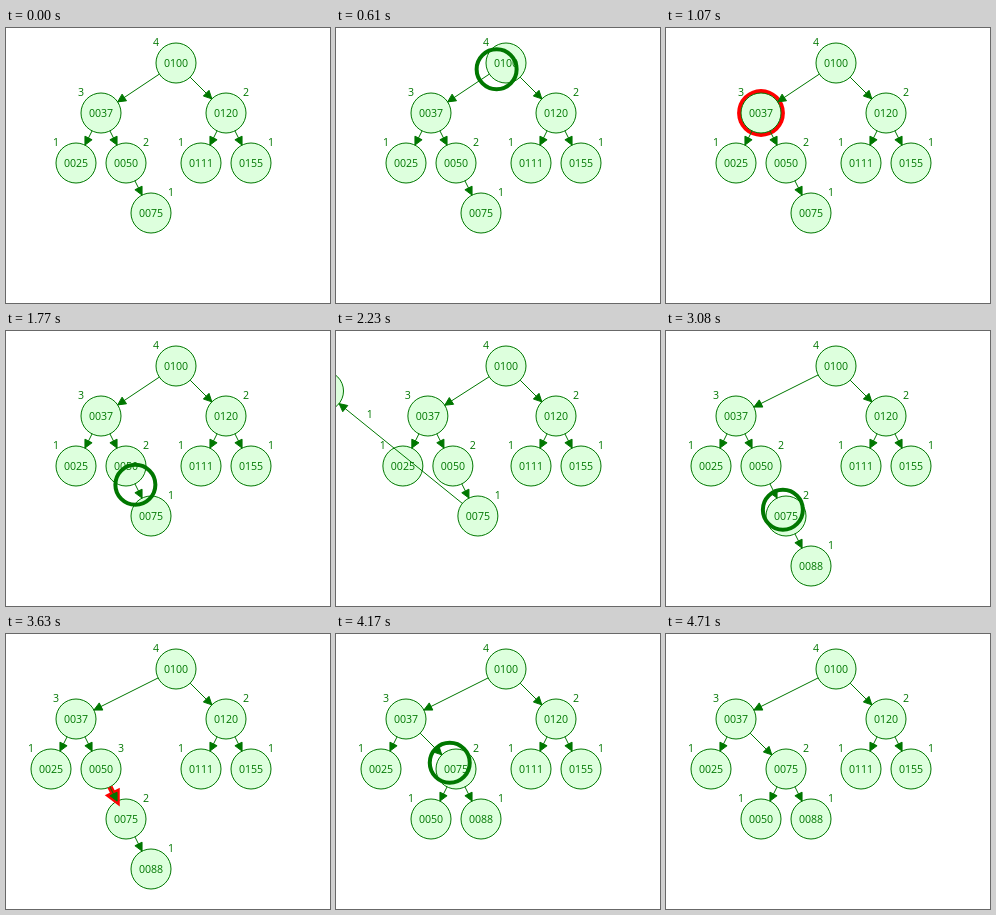
An HTML page for the animation above (5410 ms loop, 324 by 275 pixels).

```html
<!DOCTYPE html>
<html lang="en">
<head>
<meta charset="utf-8">
<title>AVL tree insertion</title>
<style>
  html, body { margin: 0; width: 100%; height: 100%; overflow: hidden; background: #fff; }
  svg { display: block; }
  text { font: 10.6px "Open Sans", "Noto Sans", sans-serif; text-anchor: middle; }
</style>
</head>
<body>
<svg id="stage" width="324" height="275" viewBox="0 0 324 275"></svg>
<script>
const GREEN = '#007700', PALE = '#ddffdd', RED = '#ff0000';
const LOOP = 5410, START = 380, TICK = 77.3;
const stage = document.getElementById('stage');

function add(tag, attrs, parent) {
  const el = document.createElementNS('http://www.w3.org/2000/svg', tag);
  set(el, attrs);
  return parent.appendChild(el);
}
function set(el, attrs) {
  for (const k in attrs) el.setAttribute(k, attrs[k]);
}
const show = (el, on) => set(el, { visibility: on ? 'visible' : 'hidden' });

const [nodeLayer, labelLayer, ringLayer, edgeLayer] = [0, 0, 0, 0].map(() => add('g', {}, stage));

// places: before the insertion, after it, after the rotation
const nodes = {};
function node(key, height, side, ...places) {
  const g = add('g', {}, nodeLayer);
  const halo = add('circle', { fill: RED }, g);
  add('circle', { r: 20, fill: PALE, stroke: GREEN }, g);
  add('text', { y: 3.6, fill: GREEN }, g).textContent = key.padStart(4, '0');
  const label = add('text', { fill: GREEN }, labelLayer);
  while (places.length < 3) places.push(places[places.length - 1]);
  const tags = places.map(([x, y]) => [x + 20 * side, y - 20.5]);
  nodes[key] = { g, halo, label, height, places, tags };
}
node('100', 4, -1, [170, 35]);
node('37', 3, -1, [95, 85], [70, 85]);
node('120', 2, 1, [220, 85]);
node('25', 1, -1, [70, 135], [45, 135]);
node('50', 2, 1, [120, 135], [95, 135], [95, 185]);
node('111', 1, -1, [195, 135]);
node('155', 1, 1, [245, 135]);
node('75', 1, 1, [145, 185], [120, 185], [120, 135]);
node('88', 1, 1, [-35, 35], [145, 235], [145, 185]);
nodes['88'].tags[0] = [15, 65];
nodes['50'].tags[2] = [75, 164.5];

const ring = add('circle', { r: 20, fill: 'none', stroke: GREEN, 'stroke-width': 4 }, ringLayer);

// each edge exists from tick "from" until tick "to"
const INSERT = 24, ROTATE = 46;
const edges = [
  ['100', '37'], ['100', '120'], ['37', '25'], ['120', '111'], ['120', '155'],
  ['37', '50', -99, ROTATE], ['50', '75', -99, ROTATE], ['75', '88', INSERT],
  ['37', '75', ROTATE], ['75', '50', ROTATE]
].map(([a, b, from = -99, to = 99]) => ({
  a, b, from, to,
  glow: add('path', { fill: RED, stroke: RED }, edgeLayer),
  line: add('path', { fill: GREEN, stroke: GREEN }, edgeLayer)
}));

// ring trips: from, to, first tick, ticks shown, speed in eighths per tick
const trips = [
  ['100', '37', 3, 4], ['37', '50', 10, 4], ['50', '75', 17, 4],
  ['88', '75', 28, 4], ['75', '50', 35, 3], ['75', '37', 49, 4], ['37', '100', 53, 3, 3]
];
const halos = { '100': 0, '37': 7, '50': 14, '75': 21 };

const clamp = v => Math.max(0, Math.min(1, v));
const lerp = (a, b, f) => a.map((v, i) => v + (b[i] - v) * f);
const eighths = (k, first = 1, speed = 2.5) => k < 0 ? 0 : clamp(Math.floor(first + speed * k) / 8);

function arrow([x1, y1], [x2, y2]) {
  const d = Math.hypot(x2 - x1, y2 - y1), ux = (x2 - x1) / d, uy = (y2 - y1) / d;
  const hx = x2 - 20 * ux, hy = y2 - 20 * uy;
  const bx = hx - 8 * ux, by = hy - 8 * uy;
  return `M${x1 + 20 * ux} ${y1 + 20 * uy}L${hx} ${hy}` +
    `M${hx} ${hy}L${bx - 4 * uy} ${by + 4 * ux}L${bx + 4 * uy} ${by - 4 * ux}Z`;
}

function draw(t) {
  const n = Math.min(56, Math.floor((t - START) / TICK + 0.2));
  const grow = eighths(n - INSERT), turn = eighths(n - ROTATE, 2);
  const place = p => turn > 0 ? lerp(p[1], p[2], turn) : lerp(p[0], p[1], grow);
  const pulse = k => 3 + Math.abs((k * 0.343) % 8 - 4);
  const at = {};

  for (const key in nodes) {
    const o = nodes[key];
    const [x, y] = at[key] = place(o.places);
    const [lx, ly] = place(o.tags);
    const first = halos[key];
    const lit = n >= first && n < first + 3;
    set(o.g, { transform: `translate(${x} ${y})` });
    set(o.halo, { r: lit ? 20 + pulse(n) : 0 });
    let h = o.height, hot = false;
    if (key === '75' && n >= 32) { h = 2; hot = n < 35; }
    if (key === '50' && n >= 38) { h = n < ROTATE ? 3 : 1; hot = n < 42; }
    o.label.textContent = h;
    set(o.label, { x: lx, y: ly + 3.7, fill: hot ? RED : GREEN });
  }
  show(nodes['88'].g, n >= INSERT);
  show(nodes['88'].label, n >= INSERT);

  const trip = trips.find(([, , s, len]) => n >= s && n < s + len);
  show(ring, trip);
  if (trip) {
    const [a, b, s, , speed] = trip;
    const [cx, cy] = lerp(at[a], at[b], eighths(n - s, 1, speed));
    set(ring, { cx, cy });
  }

  for (const e of edges) {
    const on = n >= e.from && n < e.to;
    const hot = on && e.a === '50' && n >= 42;
    const d = arrow(at[e.a], at[e.b]);
    show(e.line, on);
    show(e.glow, hot);
    set(e.line, { d });
    set(e.glow, { d, 'stroke-width': pulse(Math.min(n, 44)) });
  }
}

const begin = performance.now();
function tick() {
  draw((performance.now() - begin) % LOOP);
  requestAnimationFrame(tick);
}
tick();
</script>
</body>
</html>
```
